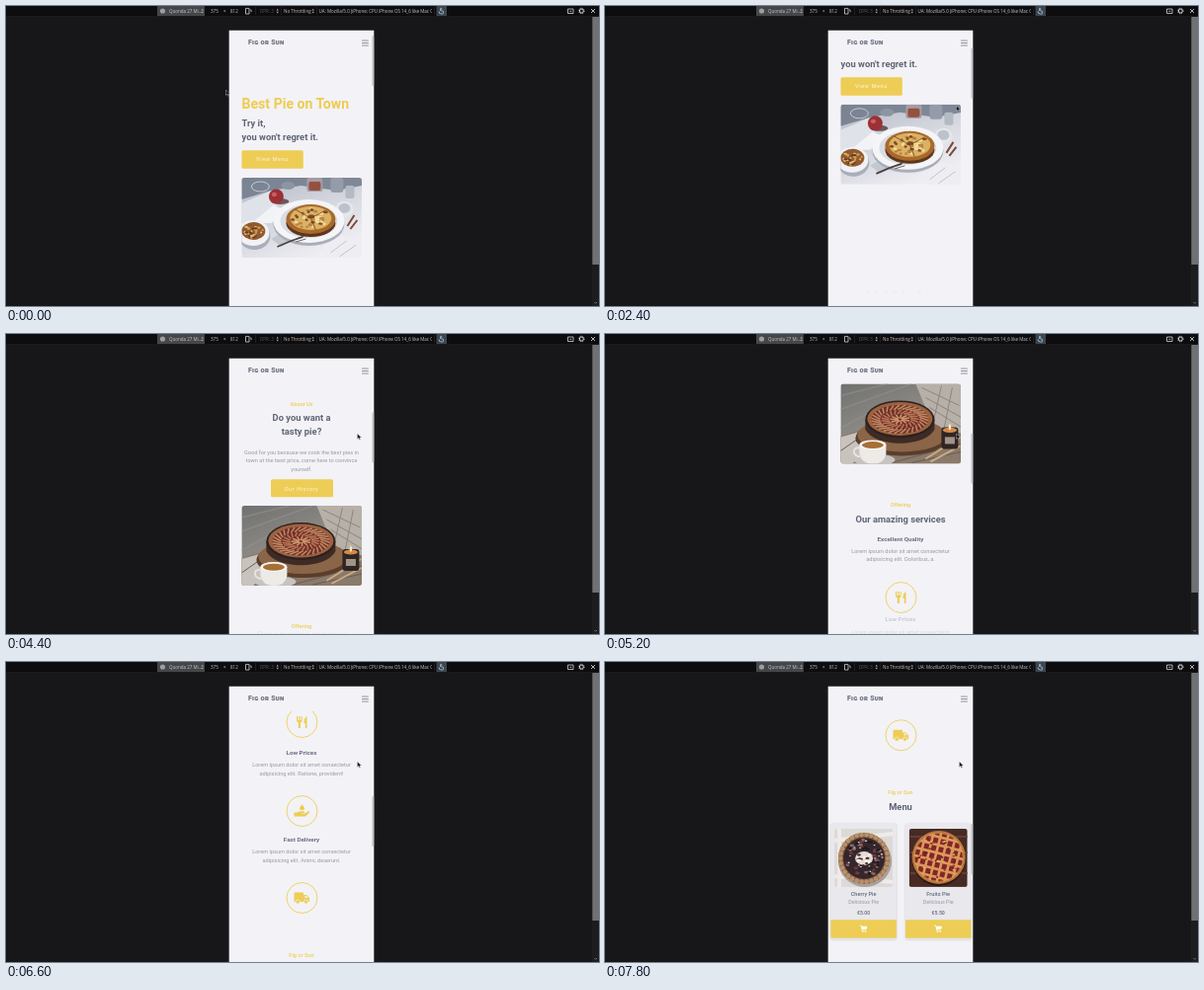
These frames come from a looping animation (600x304 px, 8 s). An HTML page:

```html
<!DOCTYPE html>
<html lang="en">
<head>
<meta charset="utf-8">
<title>Pie shop on a phone</title>
<style>
html, body { margin: 0; width: 100%; height: 100%; overflow: hidden; background: #17171a; }
svg { display: block; width: 100%; height: 100%; }
text { font-family: Roboto, sans-serif; fill: #989aa4; font-size: 5.62px; white-space: pre; }
.bar { font-family: "Open Sans", sans-serif; font-size: 4.5px; fill: #c9c9cc; }
.head { font-weight: 700; font-size: 9.37px; fill: #5f6576; }
.title { font-weight: 700; font-size: 14.1px; fill: #edcc4f; }
.sub { font-weight: 700; font-size: 6.25px; fill: #696e80; }
.dish { font-weight: 500; font-size: 5.6px; fill: #656a7c; }
.kind { font-size: 5.4px; }
.price { font-weight: 500; font-size: 5.2px; fill: #656a7c; }
.tag { font-weight: 500; fill: #ecce58; }
.btn { fill: #fbf6e2; letter-spacing: .6px; }
.logo { font-size: 7px; font-weight: 900; font-variant: small-caps; letter-spacing: .25px; fill: #6c7182; }
.mid { text-anchor: middle; }
</style>
</head>
<body>
<svg id="stage" viewBox="0 0 600 304"></svg>
<script>
const LOOP = 8000, STEP = 200;
const YELLOW = '#edcd55', PAPER = '#f3f2f6';
const BRAND = 'Fig or Sun';
const stage = document.getElementById('stage');

const rect = (x, y, w, h, fill, r = 0, more = '') =>
  `<rect x="${x}" y="${y}" width="${w}" height="${h}" rx="${r}" fill="${fill}" ${more}/>`;
const oval = (x, y, rx, ry, fill, more = '') =>
  `<ellipse cx="${x}" cy="${y}" rx="${rx}" ry="${ry}" fill="${fill}" ${more}/>`;
const shape = (d, fill, more = '') => `<path d="${d}" fill="${fill}" ${more}/>`;
const line = (d, color, w = 1, more = '') =>
  `<path d="${d}" fill="none" stroke="${color}" stroke-width="${w}" ${more}/>`;
const text = (x, y, str, cls = '', more = '') =>
  `<text x="${x}" y="${y}" class="${cls}" ${more}>${str}</text>`;
const mid = (y, str, cls = '', x = 299) => text(x, y, str, cls + ' mid');
const at = (x, y, body, more = '') => `<g transform="translate(${x} ${y})" ${more}>${body}</g>`;
const repeat = (n, fn) => Array.from({ length: n }, (_, i) => fn(i)).join('');

// Repeatable random numbers
function seeded(seed) {
  return () => (seed = (seed * 16807) % 2147483647) / 2147483647;
}

// Blocks that appear while the page scrolls: start, length, vertical shift, extra tracking
const reveals = [];
function reveal(start, length, shift, body, track = 0) {
  reveals.push({ start, length, shift, track });
  return `<g class="reveal">${body}</g>`;
}

function specks(n, seed, cx, cy, rx, ry, colors, size) {
  const rnd = seeded(seed);
  return repeat(n, i => {
    const a = rnd() * 6.283, d = Math.sqrt(rnd());
    return oval((cx + Math.cos(a) * d * rx).toFixed(1), (cy + Math.sin(a) * d * ry).toFixed(1),
      size * (.6 + rnd() * .6), size * .6, colors[i % colors.length]);
  });
}

function tablePhoto() {
  return rect(0, 0, 122, 81, 'url(#cloth)') +
    shape('M0 0H122V8L96 13 60 8 30 13 0 22Z', '#667080', 'opacity=".75"') +
    shape('M0 26L30 13 42 21 22 44 0 52Z', '#dfe2e8') +
    shape('M10 46L32 28 44 32 30 46Z', '#f2f3f6') + shape('M30 62L46 52 56 60 40 70Z', '#c3c7d0') +
    oval(19, 9, 9, 5, 'none', 'stroke="#d6dae0" stroke-width=".8"') +
    oval(47, 8, 7, 4, '#8d95a2') +
    rect(66, 0, 16, 14, '#a59ca4', 2) + rect(68, 4, 12, 9, '#94513f', 2) +
    rect(90, 0, 13, 15, '#959ca9', 3) + rect(105, 8, 9, 13, '#b4bac4', 2) +
    oval(39, 24, 9, 3, '#6b565c') + oval(35, 19, 7.5, 7.5, '#9b3036') + oval(33, 17, 2.6, 2.2, '#c9605e') +
    oval(104, 32, 9, 8, '#e6e7eb') + oval(104, 31, 6, 5, '#bcc2cc') +
    line('M107 49L114 38M110 52L117 43', '#7a4938', 2) +
    oval(68, 47, 36, 22, '#a9aeba') + oval(68, 44, 36, 22, '#f5f5f7') + oval(68, 44, 29, 17, '#d9dde4') +
    oval(70, 46, 25, 14, '#5d361d') + oval(70, 42, 25, 15, '#a9692b') + oval(70, 41, 21, 12, '#dbb164') +
    specks(44, 17, 70, 41, 19, 10, ['#f3dda0', '#7d4a22', '#bb8440'], 2.2) +
    line('M70 41L54 32M70 41L85 33M70 41L75 53', '#6f4219', .8) +
    oval(13, 59, 16, 14, '#a9aebb') + oval(12, 56, 16, 13, '#f2f2f5') + oval(12, 54, 12, 9, '#8f5b2f') +
    specks(28, 31, 12, 54, 10, 7, ['#d59a4f', '#65391c', '#e4b977'], 1.8) +
    line('M36 70L50 64 62 60', '#4c4141', 1.8) + line('M55 62L66 58M55 65L65 62', '#4c4141', .8) +
    shape('M82 70L102 58 122 64V81H88Z', '#eeeef2') + line('M90 76L106 64M99 80L116 68', '#c0c4ce', 1);
}

function woodPhoto() {
  const slice = (n, r1, r2, color) => repeat(n, i => {
    const a = i / n * 6.283, b = a + .3;
    const p = (r, q) => (60 + Math.cos(q) * r).toFixed(1) + ' ' + (36 + Math.sin(q) * r * .5).toFixed(1);
    return line(`M${p(r1, a)}L${p(r2, b)}`, color, 1.5);
  });
  return rect(0, 0, 122, 81, 'url(#wood)') +
    line('M0 12L48 0M0 26L72 0M0 45L28 30', '#92928f', 1.5, 'opacity=".6"') +
    shape('M76 0H122V54L94 44Z', '#b7b0a8') +
    line('M82 4L120 22M86 14L122 34M90 24L122 44M102 2L94 38M113 4L105 44', '#8d857a', 1) +
    shape('M0 53L36 42 122 50V81H0Z', '#8a7a6c') +
    shape('M0 54L22 48 30 60 12 81H0Z', '#c9c3bd') +
    line('M0 68L20 54M52 80L122 61M72 80L122 69', '#6b5d52', 1) +
    oval(62, 55, 47, 18, '#5a3d2b') + oval(62, 52, 45, 17, '#8b6547') +
    shape('M25 36V46C34 65 86 65 95 46V36Z', '#3f2b25') +
    oval(60, 36, 35, 19, '#2d211e') + oval(60, 35.5, 33, 17, '#9c6240') + oval(60, 36, 29, 14.5, '#72302b') +
    slice(30, 20, 29, '#c08a62') + slice(21, 11, 19, '#b87755') + slice(11, 2, 10, '#cb966a') +
    line('M86 76L121 54M91 79L121 63', '#cfab80', 1.8) +
    oval(34, 77, 21, 6, '#c6c3c0') + shape('M19 62H46V71Q44 81 33 81 21 81 19 71Z', '#edeae7') +
    line('M20 65Q12 64 14 71 17 75 22 73', '#e7e4e0', 2) +
    oval(32.5, 62, 13.5, 5, '#f8f6f3') + oval(32.5, 62.2, 11, 3.5, '#a66f36') +
    rect(102, 44, 17, 22, '#2f2523', 3) + oval(110.5, 47, 7, 2.6, '#d58a4c') +
    shape('M110.5 40Q113 45 110.5 47 108 45 110.5 40', '#fff0ad') + rect(105.5, 54, 10, 7, '#a1948a');
}

function cherryPhoto() {
  return rect(0, 0, 59, 59, '#dcd9d7') +
    line('M0 12L59 5M0 48L59 54M5 0V59', '#eeebea', 4) +
    oval(31, 33, 27, 26, '#aaa09a') + oval(30, 30, 26, 26, '#845f43') +
    repeat(30, i => oval(30 + 24 * Math.cos(i * .2094), 30 + 24 * Math.sin(i * .2094), 2.4, 2.4, '#b7916b')) +
    oval(30, 30, 21, 21, '#35262b') +
    specks(55, 41, 30, 30, 19, 19, ['#6b3a40', '#1f191f', '#8a6865'], 2.2) +
    oval(30, 30, 9, 7, '#e6dbd5') + specks(12, 9, 30, 30, 8, 6, ['#4c2c30', '#faf5ef'], 1.9) +
    specks(32, 63, 30, 30, 21, 21, ['#e2d7d0', '#49343a'], 1.2);
}

function fruitPhoto() {
  const strips = repeat(8, i => `M${4 + i * 7.5} 0V60`) + repeat(6, i => `M0 ${9 + i * 8}H60`);
  return rect(0, 0, 59, 59, '#482a25') +
    line('M0 8H59M0 24H59M0 45H59', '#633c30', 2) +
    oval(30, 31, 27, 27, '#2d1714') + oval(30, 29, 27, 27, '#b9793f') + oval(30, 29, 24, 24, '#85242a') +
    `<g clip-path="url(#round)">${line(strips, '#d99a5a', 2.6, 'transform="rotate(14 30 29)"')}</g>` +
    specks(34, 23, 30, 29, 22, 22, ['#681a20', '#e8b06c', '#a8332f'], 1.4);
}

const ICONS = {
  fork: shape('M-5.5-6V-2Q-5.5 0-3.7.4V6H-1.6V.4Q.2 0 .2-2V-6H-.7V-2H-1.5V-6H-2.2V-2H-3V-6H-3.8V-2H-4.6V-6Z' +
    'M5-6Q1.7-4 2 1H3.3V6H5Z', YELLOW),
  hand: shape('M-8 1.5H-5L-2.5.3H2Q3.2.7 2 2H-1V2.6H3L6.2.2Q8 0 7.5 1.6L3.5 5.4H-8Z' +
    'M0-6.5Q4-2.6 1.6-1H-1.6Q-4-2.6 0-6.5Z', YELLOW),
  truck: shape('M-8-5.5H1.5V-3H4.5L7.5 0V4H-8Z', YELLOW) + shape('M3-2H4.2L6.3.1H3Z', PAPER) +
    oval(-4.3, 4, 2.1, 2.1, YELLOW, `stroke="${PAPER}" stroke-width=".7"`) +
    oval(4, 4, 2.1, 2.1, YELLOW, `stroke="${PAPER}" stroke-width=".7"`),
  cart: shape('M-4-3.4H-2.3L-2-2.4H3.8L2.9 1H-1.2L-1 1.7H2.6V2.4H-1.7L-2.8-2.7H-4Z', '#fffdf2') +
    oval(-.8, 3.1, .8, .8, '#fffdf2') + oval(2.2, 3.1, .8, .8, '#fffdf2')
};
const badge = (y, icon) =>
  at(299.5, y, oval(0, 0, 15.5, 15.5, 'none', `stroke="${YELLOW}" stroke-width=".85"`) + ICONS[icon]);

const photo = (x, y, body, clip) => at(x, y, body, `clip-path="url(#${clip})"`);

function card(x, name, price, body) {
  const center = x + 33.2;
  return rect(x, 946, 66.5, 117, '#e8e8ed', 1.5, 'filter="url(#shade)"') +
    photo(x + 3.7, 951.7, body, 'square') +
    mid(1020, name, 'dish', center) + mid(1028, 'Delicious Pie', 'kind', center) +
    mid(1038.6, price, 'price', center) +
    rect(x, 1044, 66.5, 18.5, YELLOW, 1) + at(center, 1053, ICONS.cart);
}

function page() {
  return text(238.5, 103.6, 'Best Pie on Town', 'title') +
    text(238.5, 122.3, 'Try it,', 'head') + text(238.5, 136.2, "you won't regret it.", 'head') +
    rect(238.5, 146.3, 62.3, 18.5, YELLOW, 1.5) + text(253, 157.4, 'View Menu', 'btn') +
    photo(238.4, 174, tablePhoto(), 'wide') +
    reveal(2200, 800, 5, mid(361, 'About Us', 'tag'), 1.4) +
    reveal(2800, 600, -8, mid(376.5, 'Do you want a', 'head') + mid(390.7, 'tasty pie?', 'head')) +
    reveal(2900, 600, -8, mid(410, 'Good for you because we cook the best pies in') +
      mid(418.6, 'town at the best price, come here to convince') + mid(427, 'yourself.')) +
    reveal(3000, 400, 0, rect(268, 435.7, 63, 18, YELLOW, 1.5, 'id="wideBtn"') + mid(447, 'Our History', 'btn')) +
    reveal(3300, 600, -12, photo(238.4, 462.4, woodPhoto(), 'wide')) +
    reveal(3900, 500, 0, mid(586.7, 'Offering', 'tag'), .6) +
    reveal(4300, 600, -8, mid(602.7, 'Our amazing services', 'head')) +
    reveal(4450, 600, -8, mid(621.8, 'Excellent Quality', 'sub') +
      mid(633.5, 'Lorem ipsum dolor sit amet consectetur') + mid(642.1, 'adipisicing elit. Doloribus, a.')) +
    reveal(4700, 400, 0, badge(679, 'fork')) +
    reveal(4950, 700, -13, mid(711.6, 'Low Prices', 'sub') +
      mid(724, 'Lorem ipsum dolor sit amet consectetur') + mid(732.5, 'adipisicing elit. Ratione, provident!')) +
    reveal(5450, 400, 0, badge(769, 'hand')) +
    reveal(5700, 600, -13, mid(800.3, 'Fast Delivery', 'sub') +
      mid(812, 'Lorem ipsum dolor sit amet consectetur') + mid(820.5, 'adipisicing elit. Animi, deserunt.')) +
    reveal(6050, 400, 0, badge(857, 'truck')) +
    reveal(6200, 400, 0, mid(917, BRAND, 'tag'), .6) +
    reveal(6650, 500, -8, mid(933, 'Menu', 'head')) +
    reveal(6950, 600, 0, card(228.4, 'Cherry Pie', '€5.00', cherryPhoto()) +
      card(304, 'Fruits Pie', '€5.50', fruitPhoto()));
}

function toolbar() {
  const arrows = x => shape(`M${x} 4.5l1.2-1.7 1.2 1.7ZM${x} 5.7l1.2 1.7 1.2-1.7Z`, '#aaaaad');
  return rect(0, 0, 600, 10, '#0d0d0f') + rect(0, 10, 600, .5, '#1d1d20') +
    rect(153, 0, 48, 10, '#454649') + oval(158.5, 5, 2.6, 2.6, '#9d9da0') + text(165, 6.7, 'Quonda 27 Mi...', 'bar') +
    arrows(197.5) +
    text(207, 6.7, '375', 'bar') + text(220, 6.7, '×', 'bar') + text(227, 6.7, '812', 'bar') +
    line('M242.5 2.4h3.5v5.6h-3.5ZM247 3.5q2 .5 1 2.6', '#d4d4d6', .8) +
    line('M252.5 1V9M278.5 1V9M314.5 1V9M433.5 1V9', '#2b2b2e', .6) +
    text(257, 6.7, 'DPR: 3', 'bar', 'style="fill:#58585c"') + arrows(273.5) +
    text(281, 6.7, 'No Throttling', 'bar', 'style="fill:#d6c2ba"') + arrows(309.5) +
    `<g clip-path="url(#agent)">${text(316.5, 6.7, 'UA: Mozilla/5.0 (iPhone; CPU iPhone OS 14_6 like Mac OS X)', 'bar')}</g>` +
    rect(435.5, 0, 10.5, 10, '#3d454d') + line('M439 7.5L438 5.5M439.5 5V2.3h1.2V5l2 .5-.5 2.5h-2.5L438 6', '#a9cdea', .7) +
    line('M568.5 3h5.5v4.5h-5.5ZM570.3 5.3h2', '#d4d4d6', .8) +
    oval(582.3, 5, 2, 2, 'none', 'stroke="#d4d4d6" stroke-width="1"') +
    oval(582.3, 5, 2.8, 2.8, 'none', 'stroke="#d4d4d6" stroke-width=".8" stroke-dasharray="1.1"') +
    line('M592 3l4 4M596 3l-4 4', '#e0e0e2', .8);
}

const clip = (id, body) => `<clipPath id="${id}">${body}</clipPath>`;
const fade = (id, a, b) => `<linearGradient id="${id}" x2=".6" y2="1">` +
  `<stop stop-color="${a}"/><stop offset="1" stop-color="${b}"/></linearGradient>`;

stage.innerHTML = '<defs>' +
  clip('view', rect(225.7, 50, 146.6, 254, '#000')) + clip('agent', rect(315, 0, 116, 10, '#000')) +
  clip('wide', rect(0, 0, 121.6, 81, '#000', 3)) + clip('square', rect(0, 0, 59, 59, '#000', 2.5)) +
  clip('round', oval(30, 29, 25, 25, '#000')) +
  fade('cloth', '#b4bac6', '#efeef3') + fade('wood', '#70716f', '#a8a19a') +
  '<filter id="shade"><feDropShadow dx="0" dy="1" stdDeviation="1.2" flood-opacity=".18"/></filter></defs>' +
  rect(0, 0, 600, 304, '#17171a') + toolbar() +
  rect(593, 10.5, 7, 293.5, '#1d1d20') + rect(593.3, 11, 6.7, 251, '#717174') +
  line('M595.3 300l1.4 1.4 1.4-1.4', '#8d8d90', .7) +
  rect(225.7, 24.7, 146.6, 279.3, PAPER) +
  `<g clip-path="url(#view)"><g id="page">${page()}</g></g>` +
  text(245, 39.2, BRAND, 'logo') +
  line('M360 35h6.8M360 37.5h6.8M360 40h6.8', '#777b88', .8) +
  rect(370.4, 30, 1.8, 51, '#c3c3c8', .9, 'id="thumb"') +
  `<g id="cursor">${shape('M0 0V5.4L1.3 4.3 2.2 6.3 3.1 5.9 2.2 4H4Z', '#0c0c0e', 'stroke="#d9d9dc" stroke-width=".4"')}</g>`;

const $ = id => document.getElementById(id);
const pageEl = $('page'), thumb = $('thumb'), cursor = $('cursor'), wideBtn = $('wideBtn');
const blocks = [...stage.querySelectorAll('.reveal')];

// Scroll is counted in wheel notches
const NOTCH = 41.2;
const SCROLL = [[0, 0], [1800, 0], [2400, 1.8], [3600, 4], [4400, 7], [5200, 10], [6600, 15], [7800, 19], [LOOP, 19]];
const POINTER_X = [[0, 222.5], [200, 222.5], [1200, 355.5], [6800, 355.5], [7400, 358.5], [LOOP, 358.5]];
const POINTER_Y = [[0, 85], [200, 85], [1200, 101], [LOOP, 101]];

const clamp = v => Math.max(0, Math.min(1, v));

function track(keys, t) {
  const i = Math.max(1, keys.findIndex(k => k[0] >= t));
  const [t0, a] = keys[i - 1], [t1, b] = keys[i];
  return a + (b - a) * clamp((t - t0) / (t1 - t0));
}

function draw(t) {
  const scroll = track(SCROLL, t) * NOTCH;
  pageEl.setAttribute('transform', `translate(0 ${-scroll})`);
  thumb.setAttribute('y', 30 + scroll * .1715);
  cursor.setAttribute('transform', `translate(${track(POINTER_X, t)} ${track(POINTER_Y, t)})`);

  blocks.forEach((el, i) => {
    const r = reveals[i], p = clamp((t - r.start) / r.length);
    el.setAttribute('opacity', p * p * (3 - 2 * p));
    el.setAttribute('transform', `translate(0 ${r.shift * (1 - p)})`);
    if (r.track) el.firstChild.style.letterSpacing = r.track * (1 - p) * 5.62 + 'px';
  });

  const w = 63 + 12 * (1 - clamp((t - 3600) / 400));
  wideBtn.setAttribute('x', 299.5 - w / 2);
  wideBtn.setAttribute('width', w);
}

function loop(now) {
  draw(Math.floor((now % LOOP) / STEP) * STEP);
  requestAnimationFrame(loop);
}
draw(0);
requestAnimationFrame(loop);
</script>
</body>
</html>
```
